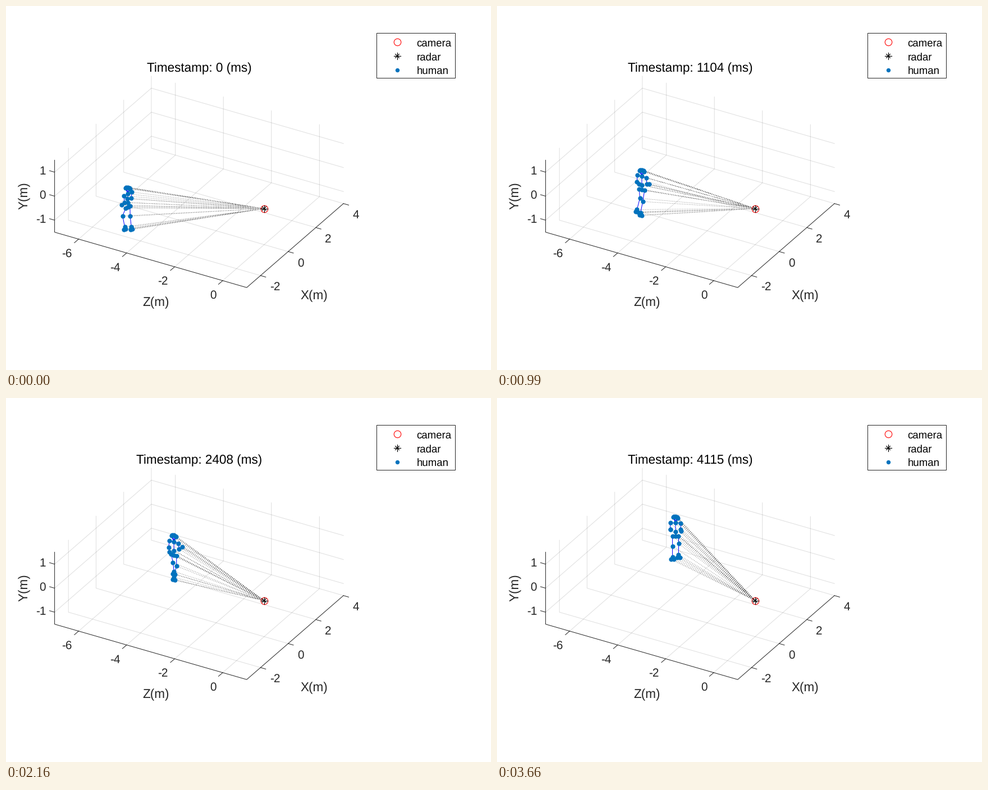
Animation of 864 by 648 pixels, one loop 3690 ms. Source, as a matplotlib script:

```python
import numpy as np
import matplotlib.pyplot as plt
from matplotlib.animation import FuncAnimation
from matplotlib.patches import Rectangle

W, H, DPI = 864, 648, 72
FRAMES, INTERVAL = 123, 30
INK, BLUE = "#262626", "#0072BD"

plt.rcParams["font.family"] = "Liberation Sans"
plt.rcParams["text.hinting"] = "no_hinting"
plt.rcParams["path.simplify"] = False

fig = plt.figure(figsize=(W / DPI, H / DPI), dpi=DPI, facecolor="white")
ax = fig.add_axes([0, 0, 1, 1])
ax.set_xlim(0, W)
ax.set_ylim(H, 0)
ax.axis("off")

# Screen vectors of one metre along each axis
ORIGIN = np.array([459.9, 360.7])
EX = np.array([24.62, -21.36])
EY = np.array([0, -42.75])
EZ = np.array([42.78, 12.32])


def project(x, y, z):
    return ORIGIN + x * EX + y * EY + z * EZ


def stroke(*points, **style):
    x, y = np.array(points).T
    ax.plot(x, y, **{"color": INK, "lw": 1, **style})


def label(x, y, text, size, color=INK, ha="center"):
    """Text whose capitals are centred on height y."""
    return ax.text(x, y + 0.36 * size, text, size=size, color=color,
                   ha=ha, va="baseline")


def star(x, y):
    for k in range(4):
        a = k * np.pi / 4
        d = (6 if k % 2 == 0 else 4.7) * np.array([np.cos(a), np.sin(a)])
        stroke((x, y) - d, (x, y) + d, color="black", lw=1.2, zorder=7)


def ring(x, y):
    ax.plot(x, y, "o", ms=12.5, mfc="none", mec="red", mew=1.1, zorder=6)


def draw_axes():
    grid = dict(alpha=0.15, zorder=1)
    lo, hi = -1.5, 1.5
    tick, title = 20.8, 22.5
    for x in range(-2, 5, 2):
        end = project(x, lo, 1)
        stroke(project(x, hi, -7), project(x, lo, -7), end, **grid)
        stroke(end, end + (9.3, 2.7))
        label(*(end + (16.3, 19)), str(x), tick, ha="left")
    for z in range(-6, 1, 2):
        end = project(-3, lo, z)
        stroke(project(4, hi, z), project(4, lo, z), end, **grid)
        stroke(end, end + (-7.5, 6.5))
        label(*(end + (-11.5, 24.5)), str(z), tick, ha="right")
    for y in range(-1, 2):
        end = project(-3, y, -7)
        stroke(end, project(4, y, -7), project(4, y, 1), **grid)
        stroke(end, end + (-9, -2.6))
        label(*(end + (-15.5, -3)), str(y), tick, ha="right")
    stroke(project(-3, hi, -7), project(-3, lo, -7),
           project(-3, lo, 1), project(4, lo, 1))
    label(548.5, 514, "X(m)", title)
    label(267, 526, "Z(m)", title)
    ax.text(39, 338, "Y(m)", size=title, color=INK, rotation=90,
            rotation_mode="anchor", ha="center", va="baseline")


def draw_legend():
    ax.add_patch(Rectangle((660, 48), 140, 80, fc="white", ec=INK, lw=1))
    ring(697, 64)
    star(697, 89)
    ax.plot(697, 113.5, "o", ms=7.4, color=BLUE, mew=0)
    for k, name in enumerate(("camera", "radar", "human")):
        label(731.5, 65 + 24.8 * k, name, 18.6, "black", ha="left")


# Where the hips pass: frame, screen x, screen y
ROUTE = np.array([(0, 217, 358), (15, 232, 351), (33, 258, 327), (61, 286, 291),
                  (84, 312, 269), (104, 323, 254), (122, 318, 246)], float)


def hips_at(f):
    """Smooth cubic curve through the route."""
    t, p = ROUTE[:, 0], ROUTE[:, 1:]
    slope = np.gradient(p, t, axis=0)
    i = min(np.searchsorted(t, f, side="right") - 1, len(t) - 2)
    span = t[i + 1] - t[i]
    u = (f - t[i]) / span
    return ((1 + 2 * u) * (1 - u) ** 2 * p[i] + u * u * (3 - 2 * u) * p[i + 1]
            + u * (1 - u) * span * ((1 - u) * slope[i] - u * slope[i + 1]))


def ease(u):
    u = np.clip(u, 0, 1)
    return u * u * (3 - 2 * u)


def pose(f):
    """Walking figure: joints on screen and the bones between them."""
    # Turns into the walk at the start, turns again near the end
    yaw = -1.3 * np.exp(-f / 5) - 0.5 * ease((f - 86) / 18)
    ahead = np.cos(yaw) * EX + np.sin(yaw) * EZ
    side = np.cos(yaw) * EZ - np.sin(yaw) * EX
    # Step cycles, quicker in the second half
    cycle = np.interp(f, [0, 61, 122], [-3.71, -1.856, 0.776])
    lean = 0.32 * np.sin(np.pi * min(f / 48, 1))

    def limb(start, length, angle):
        return start + length * (np.sin(angle) * ahead - np.cos(angle) * EY)

    root = hips_at(f)
    spine, neck = root + 0.19 * EY, root + 0.55 * EY
    bones = [[neck, spine, root]]
    for s in (-1, 1):
        phase = 2 * np.pi * cycle + (np.pi if s < 0 else 0)
        reach, lift = np.cos(phase), max(0, -np.sin(phase))

        hip = root + 0.11 * s * side
        thigh = 0.06 + 0.33 * reach + 0.25 * lift - lean
        knee = limb(hip, 0.42, thigh)
        ankle = limb(knee, 0.42, thigh - 0.12 - 0.55 * lift)
        bones.append([root, hip, knee, ankle])
        bones += [[ankle, ankle - 0.105 * EY + k * side] for k in (-0.045, 0.045)]

        shoulder = neck + 0.19 * s * side
        arm = -0.25 * reach
        elbow = limb(shoulder, 0.27, arm)
        wrist = limb(elbow, 0.22, arm + 0.9 - 0.6 * reach)
        bones.append([neck, shoulder, elbow, wrist])
    for a in np.linspace(0, np.pi, 5):
        bones.append([neck, neck + (4.3 * np.cos(a), np.cos(a) - 9.8 - 2 * np.sin(a))])
    joints = np.unique(np.vstack(bones).round(6), axis=0)
    return joints, bones


def broken(lines):
    """Join polylines into one path with gaps."""
    gap = np.full((1, 2), np.nan)
    return np.vstack([part for line in lines for part in (line, gap)]).T


def clock(f):
    # One sample is missing near the end
    return int(33.456 * (f + (f > 113)))


draw_axes()
draw_legend()
ring(*ORIGIN)
star(*ORIGIN)
title = label(344, 109, "", 22.5, "black")
rays, = ax.plot([], [], color="0.4", lw=0.8, dashes=(1.25, 2.5), zorder=3)
bones, = ax.plot([], [], color="blue", lw=1, zorder=4)
dots, = ax.plot([], [], "o", ms=8.2, color=BLUE, mew=0, zorder=5)


def update(f):
    joints, limbs = pose(f)
    rays.set_data(*broken([np.array([ORIGIN, p]) for p in joints]))
    bones.set_data(*broken(limbs))
    dots.set_data(*joints.T)
    title.set_text(f"Timestamp: {clock(f)} (ms)")
    return rays, bones, dots, title


anim = FuncAnimation(fig, update, frames=FRAMES, interval=INTERVAL,
                     repeat=True, repeat_delay=0)
plt.show()
```
